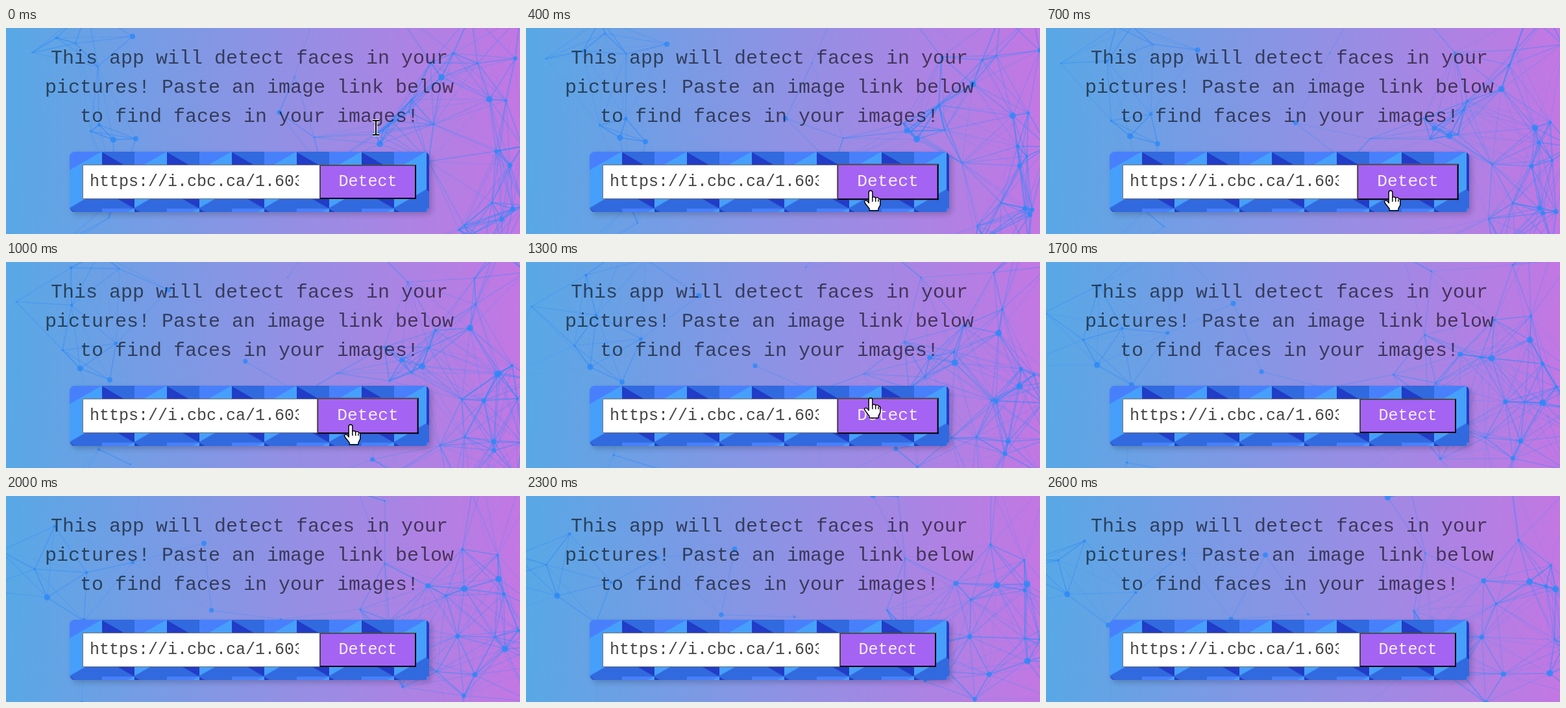
Recreate the animation shown at these times as an HTML page with a canvas. Size 792 px wide and 318 px high, loop 2700 ms.

```html
<!DOCTYPE html>
<html lang="en">
<head>
<meta charset="utf-8">
<title>Face detection form</title>
<style>
html, body { margin: 0; width: 100%; height: 100%; overflow: hidden; }
body { position: relative; font: 25px/53px "Liberation Mono", "Courier New", monospace; }
body > *, .form > * { position: absolute; box-sizing: border-box; }
canvas, svg { left: 0; top: 0; }
.intro {
  left: 25px; top: 25px; width: 700px; margin: 0;
  font-size: 30px; line-height: 45px; text-align: center; color: rgba(0, 0, 0, .6);
}
.form {
  --lit: #4880fb;
  --shade: #3169df;
  --side: #213cc6;
  --gap: transparent 12.5%, transparent 87%;
  --right-lid: var(--shade) 12%, var(--gap), var(--shade) 87.5%;
  --left-lid: var(--lit) 12%, var(--gap), var(--shade) 87.5%;
  --wall: var(--side) 25%, transparent 25.5%, transparent 75%, var(--side) 75%;
  left: 98px; top: 191px; width: 554px; height: 93px; border-radius: 8px;
  background:
    linear-gradient(30deg, var(--right-lid)) 0 0 / 100px 175px,
    linear-gradient(150deg, var(--left-lid)) 0 0 / 100px 175px,
    linear-gradient(30deg, var(--right-lid)) 50px 87.5px / 100px 175px,
    linear-gradient(150deg, var(--left-lid)) 50px 87.5px / 100px 175px,
    linear-gradient(60deg, var(--wall)) 0 0 / 100px 175px,
    linear-gradient(60deg, var(--wall)) 50px 87.5px / 100px 175px,
    #469ffa;
  box-shadow: 4px 4px 8px rgba(0, 0, 0, .2);
}
.field { left: 20px; top: 20px; width: 366px; height: 53px; background: #fff; border: 1px solid #767676; }
.link { left: 31px; top: 20px; width: 322px; overflow: hidden; white-space: nowrap; color: #444; }
.button {
  left: 385px; top: 20px; width: 149px; height: 53px;
  border: 2px solid; border-color: #4c4c4c #000 #000 #4c4c4c;
  background: #a463f2; color: rgba(255, 255, 255, .88); line-height: 49px; text-align: center;
}
</style>
</head>
<body>
<canvas width="792" height="318"></canvas>
<p class="intro">This app will detect faces in your<br>pictures! Paste an image link below<br>to find faces in your images!</p>
<div class="form">
  <div class="field"></div>
  <div class="link">https://i.cbc.ca/1.603</div>
  <div class="button">Detect</div>
</div>
<svg width="792" height="318" fill="none">
  <defs><path id="bar" d="M-5-11h4l1 1 1-1h4M0-10V10M-5 11h4l1-1 1 1h4"/></defs>
  <g id="beam">
    <use href="#bar" stroke="#fff" stroke-width="4"/>
    <use href="#bar" stroke="#000" stroke-width="2"/>
  </g>
  <g id="hand" stroke="#000" stroke-width="1.5" stroke-linejoin="round">
    <path fill="#fff" d="M-3 20V3a3 3 0 0 1 6 0V11a3 3 0 0 1 5 1a3 3 0 0 1 5 1a2.5 2.5 0 0 1 2.5 2.5V23l-3 6V32H-2V29L-9 20q-2-4 1-4q3 0 5 4z"/>
    <path d="M3 11v7M8 12v6M12.5 14v4"/>
  </g>
</svg>
<script>
const LOOP = 2700, STEP = 100, REACH = 150;
const ctx = document.querySelector('canvas').getContext('2d');
const button = document.querySelector('.button');
const beam = document.getElementById('beam');
const hand = document.getElementById('hand');

let seed = 11;
function random(min, max) {
  seed = (seed * 16807) % 2147483647;
  return min + (max - min) * seed / 2147483647;
}

const node = (x, y, vx, vy, r) => ({ x, y, vx, vy, r });

// Drifting dots between two x positions, densest near the first.
function scatter(count, dense, sparse) {
  return Array.from({ length: count }, () => {
    const angle = random(0, 2 * Math.PI), speed = random(20, 60);
    const x = dense + (sparse - dense) * random(0, 1) ** 1.3;
    return node(x, random(-40, 360), speed * Math.cos(angle), speed * Math.sin(angle), 1 + 4 * random(0, 1) ** 2);
  });
}

const nodes = [
  node(195, 13, 55, 30, 4),
  node(200, 171, -40, 11, 4),
  node(576, 179, 65, -18, 5),
  node(745, 110, 12, 63, 5),
  node(671, 76, 44, 26, 5),
  ...scatter(36, 800, 420),
  ...scatter(14, -50, 170)
];

const backdrop = ctx.createLinearGradient(0, 0, 792, 8);
backdrop.addColorStop(0, '#58a8e5');
backdrop.addColorStop(.5, '#8e92e4');
backdrop.addColorStop(1, '#c377e3');

function drawNetwork(seconds) {
  ctx.globalAlpha = 1;
  ctx.fillStyle = backdrop;
  ctx.fillRect(0, 0, 792, 318);
  ctx.fillStyle = ctx.strokeStyle = '#2c88f8';
  ctx.lineWidth = 1.8;
  const points = nodes.map(n => ({ x: n.x + n.vx * seconds, y: n.y + n.vy * seconds, r: n.r }));
  points.forEach((a, i) => {
    for (const b of points.slice(i + 1)) {
      const distance = Math.hypot(a.x - b.x, a.y - b.y);
      if (distance > REACH) continue;
      ctx.globalAlpha = .7 * (1 - distance / REACH);
      ctx.beginPath();
      ctx.moveTo(a.x, a.y);
      ctx.lineTo(b.x, b.y);
      ctx.stroke();
    }
    ctx.globalAlpha = .8;
    ctx.beginPath();
    ctx.arc(a.x, a.y, a.r, 0, 2 * Math.PI);
    ctx.fill();
  });
}

const ramp = (t, from, to) => Math.min(1, Math.max(0, (t - from) / (to - from)));
const easeOut = k => 1 - (1 - k) ** 2;

function drawPointer(t) {
  const arrive = ramp(t, 0, 300);
  const x = 570 - 39 * arrive;
  const y = 154 + 97 * arrive - 41 * ramp(t, 1000, 1300) - 240 * ramp(t, 1300, 1600);
  const onButton = y > 205;
  hand.setAttribute('transform', `translate(${x} ${y}) scale(.96)`);
  beam.setAttribute('transform', `translate(${x} ${y})`);
  hand.style.display = onButton ? '' : 'none';
  beam.style.display = onButton ? 'none' : '';
}

function render(now) {
  const t = Math.floor(now % LOOP / STEP) * STEP;
  const hover = easeOut(ramp(t, 150, 400)) - easeOut(ramp(t, 1350, 1600));
  drawNetwork(t / 1000);
  drawPointer(t);
  button.style.transform = `scale(${1 + .05 * hover})`;
}

const start = performance.now();
function tick() {
  render(performance.now() - start);
  requestAnimationFrame(tick);
}
tick();
</script>
</body>
</html>
```
